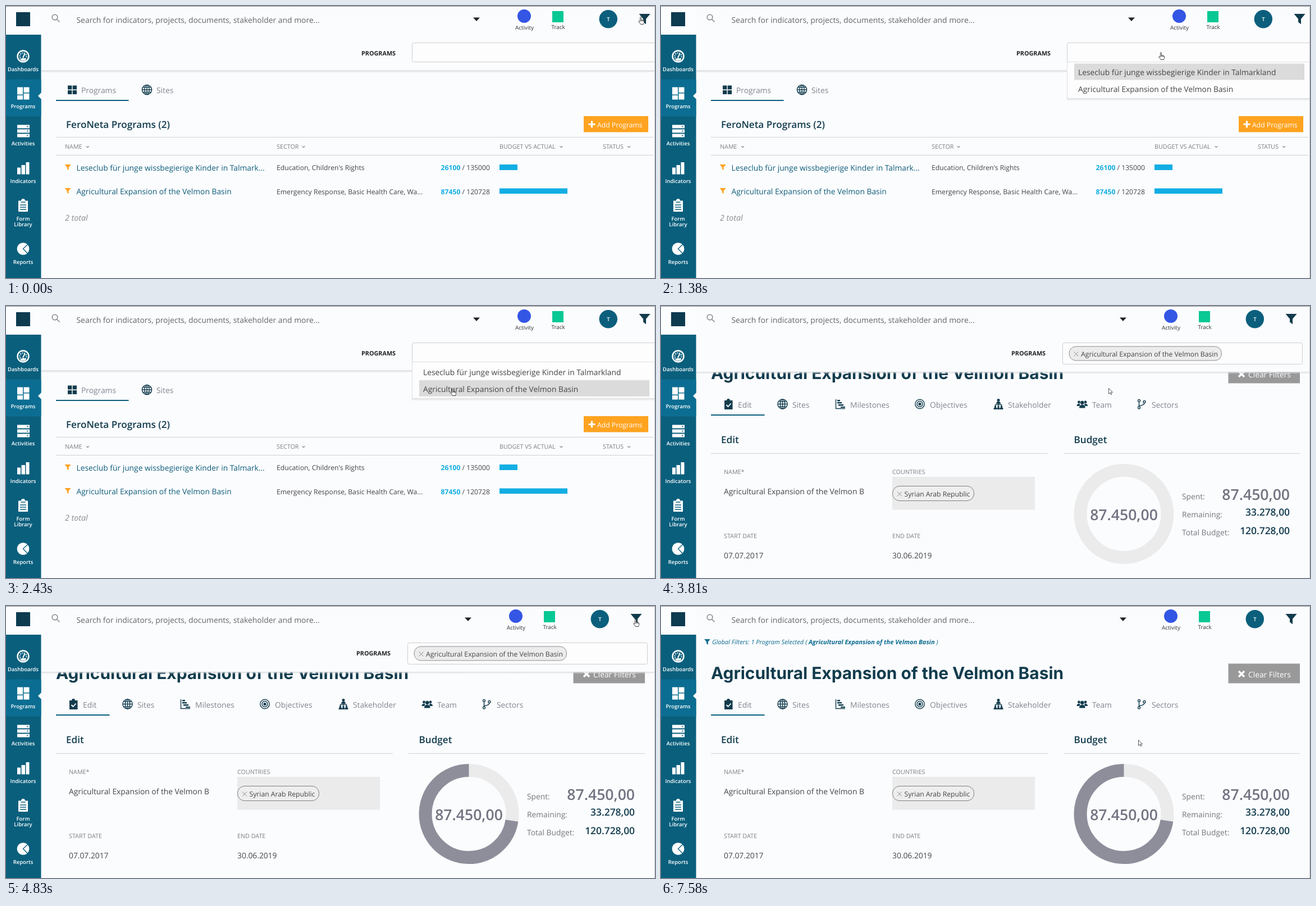
These frames come from a looping animation (1156x484 px, 8 s). An HTML page:

```html
<!DOCTYPE html>
<html lang="en">
<head>
<meta charset="utf-8">
<title>Program filter</title>
<style>
html, body { margin: 0; width: 100%; height: 100%; overflow: hidden; background: #fbfcfe; }
svg { display: block; width: 100vw; height: 100vh; }
text { font: 13.8px "Open Sans", "Noto Sans", sans-serif; text-rendering: geometricPrecision; fill: #444; }
.mid { text-anchor: middle; }
.end { text-anchor: end; }
.side text { font-size: 9.5px; font-weight: 600; fill: #fff; text-anchor: middle; }
.search { font-size: 13.9px; fill: #62666a; }
.app { font-size: 9.9px; fill: #333; text-anchor: middle; }
.initial { font-size: 9.5px; font-weight: 600; fill: #fff; text-anchor: middle; }
.field { font-size: 10.8px; font-weight: 700; fill: #222; }
.tab text { fill: #80858e; }
.head { font-size: 17.1px; font-weight: 600; fill: #123c4d; }
.label text { font-size: 10.75px; fill: #7c7f84; }
.link { fill: #0f5d7a; }
.small text, .small { font-size: 12.2px; }
.small tspan { font-weight: 700; fill: #12aee4; }
.total { font-size: 14.3px; font-style: italic; fill: #8a8d92; }
.white { fill: #fff; }
.title { font: 700 29.85px Inter, sans-serif; fill: #123c4d; }
.big { font-size: 26.6px; font-weight: 600; fill: #737382; }
.sum { font-size: 17.4px; font-weight: 600; fill: #123c4d; }
.muted text { fill: #74777d; }
.note { font-size: 11.05px; font-style: italic; fill: #0b6b8f; }
.note tspan { font-weight: 700; }
.ink { fill: #123c4d; }
.line { fill: none; stroke: #123c4d; stroke-width: 1.4; }
.cut { fill: none; stroke: #0a5f7d; stroke-width: 1.3; }
.rule { stroke: #cfd1d4; }
.chev { fill: none; stroke: #7c7f84; stroke-width: 1.1; }

/* Hard cuts on an 8 s loop */
.list, .detail, .menu, .picked, .open, .note-bar, .pick, .shift, .arc, .cursor, .hand, .arrow {
  animation: 8s step-end infinite;
}
.list { animation-name: list; }
.detail, .picked { animation-name: detail; }
.detail, .picked, .note-bar, .menu, .arrow { opacity: 0; }
.menu { animation-name: menu; }
.pick { animation-name: pick; }
.open { animation-name: open; }
.note-bar { animation-name: note; }
.shift { animation-name: shift; }
.arc { animation-name: arc; }
.cursor { animation-name: cursor; }
.hand { animation-name: hand; }
.arrow { animation-name: arrow; }
@keyframes list { 0% { opacity: 1; } 47.625%, 100% { opacity: 0; } }
@keyframes detail { 0% { opacity: 0; } 47.625%, 100% { opacity: 1; } }
@keyframes menu { 0% { opacity: 0; } 17.25% { opacity: 1; } 47.625%, 100% { opacity: 0; } }
@keyframes pick { 0% { transform: translateY(0); } 30.375%, 100% { transform: translateY(29.5px); } }
@keyframes open { 0% { opacity: 1; } 73.5%, 100% { opacity: 0; } }
@keyframes note { 0% { opacity: 0; } 73.5%, 100% { opacity: 1; } }
@keyframes shift { 0% { transform: translateX(0); } 47.625%, 100% { transform: translateX(-15px); } }
@keyframes arc {
  0% { stroke-dasharray: 0 360; }
  51.875% { stroke-dasharray: 82 360; }
  56.125% { stroke-dasharray: 233 360; }
  60.375%, 100% { stroke-dasharray: 261 360; }
}
@keyframes cursor {
  0% { transform: translate(1126px, 19px); }
  4.25% { transform: translate(896px, 82px); }
  8.5% { transform: translate(886px, 82px); }
  26.125% { transform: translate(875px, 93px); }
  30.375% { transform: translate(791px, 146px); }
  47.625% { transform: translate(797px, 146px); }
  51.875% { transform: translate(806px, 150px); }
  56.125% { transform: translate(1080px, 30px); }
  60.375% { transform: translate(1117px, 23px); }
  82.125% { transform: translate(1112px, 24px); }
  86.25% { transform: translate(1026px, 53px); }
  90.5% { transform: translate(911px, 137px); }
  94.75%, 100% { transform: translate(850px, 238px); }
}
@keyframes hand {
  0% { opacity: 1; } 47.625% { opacity: 0; } 60.375% { opacity: 1; } 86.25%, 100% { opacity: 0; }
}
@keyframes arrow {
  0% { opacity: 0; } 47.625% { opacity: 1; } 60.375% { opacity: 0; } 86.25%, 100% { opacity: 1; }
}
</style>
</head>
<body>
<svg viewBox="0 0 1156 484" preserveAspectRatio="none">
  <defs>
    <path id="funnel" d="M0 0h20l-7.5 9v9.5l-5-4V9z"/>
    <path id="chev" class="chev" d="M-2.5-1.2L0 1.2L2.5-1.2"/>
    <path id="cross" d="M-4-4L4 4M4-4L-4 4" stroke="#8a8a8a"/>
    <g id="globe" class="line">
      <circle r="8.6"/>
      <ellipse rx="4.2" ry="8.6"/>
      <path d="M0-8.6V8.6M-8.6 0H8.6M-7.3-4.4H7.3M-7.3 4.4H7.3"/>
    </g>
    <linearGradient id="fade" x2="0" y2="1">
      <stop stop-color="#dcdde0"/><stop offset="1" stop-color="#dcdde0" stop-opacity="0"/>
    </linearGradient>
  </defs>
  <rect width="1156" height="484" fill="#fbfcfe"/>

  <g class="list">
    <g class="tab">
      <path class="ink" d="M110 141.500h7.300v7h-7.300zM118.700 141.500h7.300v7h-7.300zM110 150h7.300v7h-7.300zM118.700 150h7.300v7h-7.300z"/>
      <text x="134" y="155">Programs</text>
      <use href="#globe" x="251" y="149"/>
      <text x="268" y="155">Sites</text>
      <rect x="89" y="167" width="129.500" height="2" fill="#0b5f7c"/>
    </g>
    <text class="head" x="107" y="217">FeroNeta Programs (2)</text>
    <rect x="1029" y="196" width="115" height="28.500" fill="#ffa320"/>
    <path d="M1037.500 210.500h12M1043.500 204.500v12" stroke="#fff" stroke-width="3.200"/>
    <text class="small white" x="1053" y="215.500">Add Programs</text>
    <path class="rule" d="M89 233.500H1153M89 265.500H1153"/>
    <g class="label">
      <text x="105" y="253.500">NAME</text><use href="#chev" x="145.500" y="250.500"/>
      <text x="482" y="253.500">SECTOR</text><use href="#chev" x="530" y="250.500"/>
      <text x="879" y="253.500">BUDGET VS ACTUAL</text><use href="#chev" x="989" y="250.500"/>
      <text x="1063" y="253.500">STATUS</text><use href="#chev" x="1109.500" y="250.500"/>
    </g>
    <g fill="#ffa320">
      <use href="#funnel" transform="translate(104.500 282) scale(.56)"/>
      <use href="#funnel" transform="translate(104.500 324) scale(.56)"/>
    </g>
    <text class="link" x="125.500" y="293">Leseclub für junge wissbegierige Kinder in Talmark...</text>
    <text class="link" x="125.500" y="335">Agricultural Expansion of the Velmon Basin</text>
    <g class="small">
      <text x="482" y="292">Education, Children's Rights</text>
      <text x="482" y="334.500">Emergency Response, Basic Health Care, Wa...</text>
      <text class="end" x="862" y="292"><tspan>26100</tspan> / 135000</text>
      <text class="end" x="862" y="334.500"><tspan>87450</tspan> / 120728</text>
    </g>
    <path d="M879 282h32v10h-32zM879 324.500h121v9.500h-121z" fill="#12aee4"/>
    <text class="total" x="105" y="382">2 total</text>
  </g>

  <g class="detail">
    <text class="title" x="89" y="129.500">Agricultural Expansion of the Velmon Basin</text>
    <rect x="1010.500" y="102.500" width="127.500" height="35" fill="#999"/>
    <path d="M1029 116l10 10M1039 116l-10 10" stroke="#fff" stroke-width="3.400"/>
    <text class="white" x="1046" y="126.500">Clear Filters</text>

    <g class="tab">
      <path class="ink" d="M113 168h4a3 3 0 0 1 6 0h4.500v16H113z"/>
      <path d="M116.500 176l3 3l5-5.500" fill="none" stroke="#fff" stroke-width="1.800"/>
      <text x="137" y="181">Edit</text>
      <use href="#globe" x="216.500" y="174.500"/>
      <text x="234" y="181">Sites</text>
      <path class="line" d="M311.500 166v16.500H328"/>
      <path class="ink" d="M314 167h5v2.500h-5zM314 171h8v2.500h-8zM316 175h9v2.500h-9zM320 179h8v2h-8z"/>
      <text x="337" y="181">Milestones</text>
      <g class="line"><circle cx="461" cy="174.500" r="8.200"/><circle cx="461" cy="174.500" r="5"/></g>
      <circle class="ink" cx="461" cy="174.500" r="2.600"/>
      <text x="479" y="181">Objectives</text>
      <g class="ink">
        <circle cx="601" cy="167.500" r="2.500"/>
        <path d="M597 174q0-4 4-4t4 4zM592.500 184q0-4 3-4t3 4zM598.500 184q0-4 2.500-4t2.500 4zM603.500 184q0-4 3-4t3 4z"/>
        <circle cx="595.500" cy="179" r="1.700"/><circle cx="601" cy="179" r="1.700"/><circle cx="606.500" cy="179" r="1.700"/>
      </g>
      <path class="line" d="M601 173v4M595.500 178v-2.500h11v2.500"/>
      <text x="618" y="181">Stakeholder</text>
      <g class="ink">
        <circle cx="744.500" cy="171" r="2.400"/><circle cx="756" cy="171" r="2.400"/><circle cx="750.300" cy="172" r="3.200"/>
        <path d="M740.500 178q0-4 4-4h2l-1 4zM760 178q0-4-4-4h-2l1 4zM745 181.500q0-6 5.300-6t5.300 6z"/>
      </g>
      <text x="768" y="181">Team</text>
      <g class="line">
        <circle cx="851.500" cy="168.500" r="2"/><circle cx="851.500" cy="181" r="2"/><circle cx="861" cy="170.500" r="2"/>
        <path d="M851.500 170.500v8.500M861 172.500q0 4-9 5"/>
      </g>
      <text x="874" y="181">Sectors</text>
      <rect x="89" y="193" width="95.500" height="2" fill="#0b5f7c"/>
    </g>

    <text class="head" x="107" y="244">Edit</text>
    <text class="head" x="735.500" y="244">Budget</text>
    <path class="rule" d="M89 262.500H689M717 262.500H1138"/>
    <g class="label">
      <text x="112" y="299">NAME*</text>
      <text x="412" y="299">COUNTRIES</text>
      <text x="112" y="413">START DATE</text>
      <text x="412" y="413">END DATE</text>
    </g>
    <text x="112" y="335">Agricultural Expansion of the Velmon B</text>
    <rect x="412" y="304" width="254" height="58.500" fill="#ebebeb"/>
    <rect x="412.500" y="320.500" width="145" height="26" rx="12.500" fill="#eee" stroke="#808080"/>
    <use href="#cross" x="425" y="334.500"/>
    <text class="small" x="433.500" y="339">Syrian Arab Republic</text>
    <text x="112" y="449">07.07.2017</text>
    <text x="412" y="449">30.06.2019</text>

    <g fill="none" stroke-width="23">
      <circle cx="824.500" cy="370" r="77.500" stroke="#ebebeb"/>
      <path class="arc" d="M824.500 292.500a77.500 77.500 0 0 0 0 155a77.500 77.500 0 0 0 0-155" pathLength="360" stroke="#8e8e9b" stroke-dasharray="0 360"/>
    </g>
    <text class="big mid" x="824.500" y="381">87.450,00</text>
    <g class="muted">
      <text x="928" y="344">Spent:</text>
      <text x="928" y="376">Remaining:</text>
      <text x="928" y="408">Total Budget:</text>
    </g>
    <text class="big end" x="1120" y="345">87.450,00</text>
    <text class="sum end" x="1120" y="373">33.278,00</text>
    <text class="sum end" x="1120" y="405.500">120.728,00</text>
  </g>

  <g class="open">
    <g class="list">
      <rect x="63" y="51" width="1093" height="64" fill="#fbfcfe"/>
      <rect x="63" y="114" width="1093" height="3.500" fill="#e4e5e8"/>
      <text class="field" x="633" y="87.500">PROGRAMS</text>
      <rect x="723.500" y="65.500" width="450" height="34" rx="3" fill="#fdfdfe" stroke="#cbcdd0"/>
    </g>
    <g class="picked">
      <rect x="63" y="51" width="1093" height="66" fill="#fbfcfe"/>
      <rect x="63" y="117" width="1093" height="4" fill="url(#fade)"/>
      <text class="field" x="624" y="87.500">PROGRAMS</text>
      <rect x="715.500" y="65.500" width="427" height="38" rx="3" fill="#fdfdfe" stroke="#cbcdd0"/>
      <rect x="727" y="72" width="271.500" height="25" rx="12" fill="#ececec" stroke="#8c8c8c"/>
      <use href="#cross" x="739.500" y="85.500"/>
      <text class="small" x="748" y="90">Agricultural Expansion of the Velmon Basin</text>
    </g>
  </g>

  <g class="menu">
    <rect x="723" y="164" width="433" height="5" fill="url(#fade)"/>
    <rect x="723.500" y="99.500" width="450" height="65" fill="#fdfdfe" stroke="#dedfe2"/>
    <rect class="pick" x="736" y="102.500" width="410" height="29" fill="#dbdbdb"/>
    <text x="743" y="123">Leseclub für junge wissbegierige Kinder in Talmarkland</text>
    <text x="743" y="152.500">Agricultural Expansion of the Velmon Basin</text>
  </g>

  <g class="note-bar">
    <use href="#funnel" transform="translate(77 59) scale(.54)" fill="#0b6b8f"/>
    <text class="note" x="91" y="68">Global Filters: 1 Program Selected ( <tspan>Agricultural Expansion of the Velmon Basin</tspan> )</text>
  </g>

  <g fill="none" stroke="#858585" stroke-width="1.500">
    <circle cx="87" cy="20" r="4.800"/><path d="M90.500 23.500l5 5"/>
  </g>
  <text class="search" x="125.500" y="29.500">Search for indicators, projects, documents, stakeholder and more...</text>
  <g class="shift">
    <path d="M832 20.500h12l-6 6.500z" fill="#222"/>
    <circle cx="923" cy="18" r="12" fill="#3456e4"/>
    <text class="app" x="923.500" y="42">Activity</text>
    <rect x="973" y="9" width="20" height="20" fill="#08c894"/>
    <text class="app" x="983.500" y="41">Track</text>
    <circle cx="1072.800" cy="23.300" r="16.200" fill="#0b5f7c"/>
    <text class="initial" x="1073" y="27">T</text>
    <use class="ink" href="#funnel" x="1127.500" y="14"/>
  </g>

  <g class="side">
    <rect width="63" height="51" fill="#fcfdff"/>
    <rect x="18" y="11" width="25" height="25" fill="#0d3b4f"/>
    <rect y="51" width="62.500" height="433" fill="#0a5f7d"/>
    <rect y="130.500" width="62.500" height="66" fill="#0b6d91"/>
    <path d="M63 154v12l-6-6z" fill="#fbfcfe"/>
    <g fill="none" stroke="#fff">
      <circle cx="30.500" cy="89.500" r="10" stroke-width="2.400"/>
      <circle cx="30.500" cy="89.500" r="6" stroke-width="2.200" stroke-dasharray="1.800 2" pathLength="38"/>
      <path d="M30 92l3.500-7" stroke-width="2"/>
    </g>
    <path d="M25 95q5.500-5 11 0l-2 2.500h-7z" fill="#fff"/>
    <text x="30.500" y="115.500">Dashboards</text>
    <path d="M20 144.500h10v13H20zM20 159h10v7.500H20zM31.500 144.500h10v9.500h-10zM31.500 155.500h10v11h-10z" fill="#fff"/>
    <text x="30.500" y="182">Programs</text>
    <path d="M20 211.500h22v6H20zM20 219.500h22v6H20zM20 227.500h22v6H20z" fill="#fff"/>
    <path class="cut" d="M37 214.500h2.500M37 222.500h2.500M37 230.500h2.500"/>
    <text x="30.500" y="248">Activities</text>
    <path d="M20 287.500h6v12h-6zM27.500 283h6.500v16.500h-6.500zM35.500 278h6v21.500h-6z" fill="#fff"/>
    <text x="30.500" y="314.500">Indicators</text>
    <path d="M22 346.500h5a3.500 3.500 0 0 1 7 0h5V366H22z" fill="#fff"/>
    <path class="cut" d="M26.500 349h8M25 354h11M25 358h11M25 362h11"/>
    <text x="30.500" y="381.500">Form</text>
    <text x="30.500" y="392">Library</text>
    <circle cx="30.500" cy="432" r="10.800" fill="#fff"/>
    <path class="cut" d="M39 424L30.500 432l8 8.500"/>
    <text x="30.500" y="458.500">Reports</text>
  </g>

  <rect width="1156" height="1" fill="#8c8e90"/>
  <rect x="1155" width="1" height="484" fill="#c6c8ca"/>

  <g class="cursor" fill="#fff" stroke="#333" stroke-linejoin="round">
    <path class="hand" d="M3.500 8.500V1.500a1 1 0 0 1 2 0v4.300l3.600.7q1.400.3 1.400 1.600v2.200q0 1-.8 2v1.200H4.300l-.5-1.200L.9 8.800q-.4-1 .5-1.300q1 0 2.100 1.500M5.500 5.800v2.200M7.200 6.200v2M8.900 6.500v2" stroke-width=".9"/>
    <path class="arrow" d="M.5.500v10l2.300-2.200l1.600 3.400l1.500-.7l-1.600-3.300h3.200z" stroke-width=".8"/>
  </g>
</svg>
</body>
</html>
```
